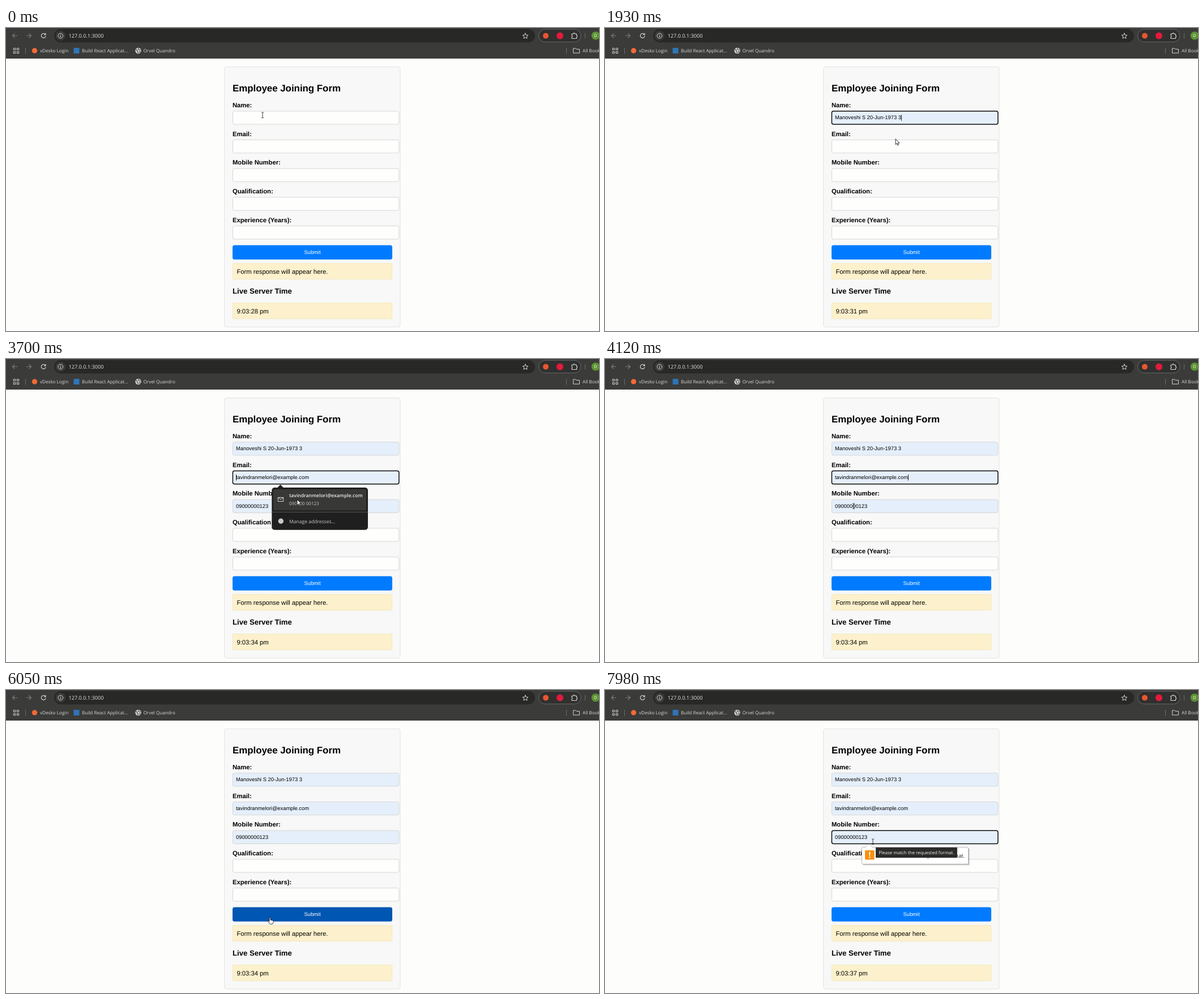
These frames come from a looping animation (1047x535 px, 8000 ms). An HTML page:

```html
<!DOCTYPE html>
<html lang="en">
<head>
<meta charset="utf-8">
<title>Employee Joining Form</title>
<style>
  html, body { margin: 0; width: 100%; height: 100%; overflow: hidden; background: #fdfdfc; }
  svg { display: block; width: 100%; height: 100%; }
  text { font-family: "Liberation Sans", Arial, sans-serif; font-size: 11.23px; text-rendering: geometricPrecision; white-space: pre; }
  .ui text { font-family: "Open Sans", "Noto Sans", sans-serif; }
  .bar text { font-size: 8.15px; fill: #d8d8d6; }
  .menu text { font-size: 8.55px; fill: #c9c9c7; }
  .menu .strong { font-weight: 600; fill: #ececea; }
  .label { font-weight: bold; }
  .value { font-size: 9.36px; }
  .line { fill: none; stroke: #d4d4d2; stroke-width: 1.2; stroke-linecap: round; stroke-linejoin: round; }
  .note { fill: #fcf1cc; stroke: #f6e6b4; stroke-width: .8; }
</style>
</head>
<body>
<svg id="stage" viewBox="0 0 1047 535">
  <rect width="1047" height="535" fill="#fdfdfc"/>

  <g class="ui bar">
    <rect width="1047" height="54" fill="#3b3b39"/>
    <rect x="85" y="2" width="849" height="23.5" rx="11.7" fill="#282827"/>
    <path class="line" d="M19.5 13.5H11.5M15 10l-3.5 3.5 3.5 3.5" style="stroke:#7c7c7a"/>
    <path class="line" d="M36.500 13.500H44.500M41 10l3.500 3.500-3.500 3.500" style="stroke:#7c7c7a"/>
    <path class="line" d="M69.300 11.200A3.900 3.900 0 1 0 70 14.600M70 9.500V12H67.500"/>
    <circle cx="96.300" cy="13.700" r="8.600" fill="#3b3b39"/>
    <circle class="line" cx="96.300" cy="13.700" r="4.300" style="stroke-width:1"/>
    <path class="line" d="M96.300 13.500V15.700M96.300 11.600v.1"/>
    <text x="110.500" y="17.200" style="font-size:9.150px;fill:#e4e4e2">127.0.0.1:3000</text>
    <path class="line" d="M917 9.200l1.400 3.200 3.500.3-2.700 2.300.8 3.400-3-1.800-3 1.800.8-3.400-2.700-2.300 3.500-.3z" style="stroke-width:1"/>
    <rect x="940.500" y="2.300" width="74.500" height="22.400" rx="11.200" fill="#30302f" stroke="#66686b"/>
    <circle cx="953" cy="13.700" r="5" fill="#e8562f"/>
    <circle cx="978" cy="13.700" r="6" fill="#e21b3c"/>
    <path class="line" d="M999 10.500h2.600a1.600 1.600 0 0 1 3.200 0h2.700v2.900a1.500 1.500 0 0 1 0 2.900v2.200h-8.500v-2.500a1.500 1.500 0 0 0 0-2.800z"/>
    <path d="M1022.500 9v9.500M34.500 35v10.500M989.500 35v10.500" stroke="#6c6c69"/>
    <circle cx="1041" cy="13.500" r="7.300" fill="#5c9432"/>
    <text x="1038" y="16.300" style="fill:#fff;font-size:7.500px">D</text>

    <g class="line" style="stroke-width:1">
      <path d="M13.700 35.700h3v3h-3zM19.700 35.700h3v3h-3zM13.700 41.700h3v3h-3zM19.700 41.700h3v3h-3z"/>
      <path d="M1002 36h3.700l1.200 1.400h5.600v6.800h-10.500z"/>
    </g>
    <circle cx="50.500" cy="40" r="4.700" fill="#f26a35"/>
    <rect x="119.500" y="35" width="10" height="10" fill="#2f74b5"/>
    <circle cx="233.500" cy="40" r="5.200" fill="#d4d4d2"/>
    <path d="M229.500 37.500l2.500 2-.4 1.600 1.700 1.600-.5 1.800M234.500 35.500l-1 1.700 2 1.500h2.300M235 41.500l2 .5-1.300 1.700" fill="none" stroke="#3b3b39" stroke-width="1.100"/>
    <text x="60" y="43">vDesko Login</text>
    <text x="134" y="43">Build React Applicat...</text>
    <text x="242.500" y="43">Orvel Quandro</text>
    <text x="1018" y="43">All Bookmarks</text>
  </g>

  <rect x="385.700" y="68.600" width="310.300" height="459.400" rx="3.500" fill="#f7f8f7" stroke="#e0e0de" stroke-width=".9"/>
  <text class="label" x="400" y="112" style="font-size:16.850px">Employee Joining Form</text>
  <g id="form"></g>
  <rect id="button" x="400" y="383.500" width="282" height="25.300" rx="3.500"/>
  <text class="value" x="541" y="398.700" text-anchor="middle" fill="#fff">Submit</text>
  <rect class="note" x="400.400" y="415.700" width="281.300" height="27.600"/>
  <text x="407.500" y="433.700">Form response will appear here.</text>
  <text class="label" x="400" y="469" style="font-size:13.140px">Live Server Time</text>
  <rect class="note" x="400.400" y="485.700" width="281.300" height="27.600"/>
  <text id="clock" x="407.500" y="503.700"></text>
  <rect id="caret" y="0" width=".9" height="10.500"/>

  <g id="nameMenu" class="ui menu">
    <path d="M478.500 177.500l6-6.300 6 6.300z" fill="#1f1f1f"/>
    <rect x="469.300" y="176.500" width="154" height="88.800" rx="5" fill="#1f1f1f"/>
    <rect class="hover" x="472" y="179.300" width="148.500" height="25.700" rx="3" fill="#383836"/>
    <g class="person"></g>
    <text class="strong" x="500" y="195.200">Manoveshi S 20-Jun-1973 3</text>
    <text class="strong" x="500" y="220.600">Dhelvomar 27-May-1974 4</text>
    <path d="M469.500 233.700h153.500" stroke="#5a5a58"/>
    <circle cx="485.300" cy="249.700" r="4.700" fill="#c9c9c7"/>
    <text x="500" y="252.700">Manage addresses...</text>
  </g>

  <g id="mailMenu" class="ui menu">
    <path d="M478.500 228l6-6.300 6 6.300z" fill="#1f1f1f"/>
    <rect x="469.300" y="227" width="169.700" height="74.700" rx="5" fill="#1f1f1f"/>
    <rect class="hover" x="472" y="230" width="164.300" height="37.300" rx="3" fill="#383836"/>
    <path class="line" d="M480.700 244.500h9v7h-9zl4.500 3.500 4.500-3.500" style="stroke-width:1"/>
    <text class="strong" x="500" y="244.300">tavindranmelori@example.com</text>
    <text x="500" y="258.200" style="font-size:8.050px">090000 00123</text>
    <path d="M469.500 270.300h169.300" stroke="#5a5a58"/>
    <circle cx="485.300" cy="286.300" r="4.700" fill="#c9c9c7"/>
    <text x="500" y="289.500">Manage addresses...</text>
  </g>

  <g id="bubble" class="ui">
    <path d="M456 280.500h188v29.500h-188z" fill="#000" opacity=".1"/>
    <path d="M455 279.500h188v29.300h-188z" fill="#000" opacity=".16"/>
    <path d="M455.500 277.800h4.500l6-6 6 6h167.500q2 0 2 2v25.500q0 2-2 2h-184q-2 0-2-2v-25.500q0-2 2-2z" fill="#fff" stroke="#a9a9a7" stroke-width=".8"/>
    <rect x="459" y="283" width="16.600" height="16.600" rx="1.500" fill="#f8900f"/>
    <path d="M466.200 286h2.200l-.3 6.500h-1.600zM466.200 294.200h2.200v2.200h-2.200z" fill="#fff"/>
    <text x="481" y="296.300" fill="#222" style="font-size:9.230px">Please match the requested format.</text>
  </g>
  <g id="tip" class="ui">
    <rect x="478.300" y="278.300" width="143" height="17.500" fill="#2b2b2a" stroke="#111" stroke-width=".7"/>
    <text x="483.300" y="290" fill="#f2f2f0" style="font-size:7.970px">Please match the requested format.</text>
  </g>

  <g id="cursor">
    <path id="beam" d="M-2-4.500h1.500l.5.500.5-.500H2M0-4v8.500M-2 5h1.500l.5-.500.5.500H2" fill="none" stroke="#222" stroke-width=".9"/>
    <path id="arrow" d="M0 0v10l2.300-2.100 1.500 3.500 1.600-.7-1.500-3.400h3.100z" fill="#fff" stroke="#000" stroke-width=".8"/>
    <path id="hand" d="M-1 .3q1-1 2 0v4.200l4.200 1q1 .3 1 1.300l-.7 3.300q-.3 1.700-1.800 1.700H.8q-1 0-1.600-1L-3.500 7q-.2-1.200 1-1l1.500 1.200z" fill="#fff" stroke="#000" stroke-width=".8"/>
  </g>
</svg>
<script>
const LOOP = 8000, BLINK = 500, PITCH = 50.7, TOP = 146.8, BOX_H = 23.2;
const $ = id => document.getElementById(id);
const show = (node, on) => node.setAttribute('visibility', on ? 'visible' : 'hidden');

function add(parent, tag, attrs, text = '') {
  const node = document.createElementNS('http://www.w3.org/2000/svg', tag);
  for (const key in attrs) node.setAttribute(key, attrs[key]);
  node.textContent = text;
  parent.appendChild(node);
  return node;
}

// filled: when each value, typed in or previewed, appears
const fields = [
  { label: 'Name:', text: 'Manoveshi S 20-Jun-1973 3', filled: 1010 },
  { label: 'Email:', text: 'tavindranmelori@example.com', filled: 2900 },
  { label: 'Mobile Number:', text: '09000000123', filled: 2900 },
  { label: 'Qualification:', text: '', filled: Infinity },
  { label: 'Experience (Years):', text: '', filled: Infinity }
].map((field, i) => {
  const y = TOP + PITCH * i, form = $('form');
  add(form, 'text', { class: 'label', x: 400, y: y - 6.8 }, field.label);
  return {
    ...field, y,
    box: add(form, 'rect', { x: 400.4, y, width: 293.4, height: BOX_H, rx: 3 }),
    value: add(form, 'text', { class: 'value', x: 406, y: y + 14.3 }, field.text)
  };
});

for (const y of [191.7, 217.2]) {
  const g = add(document.querySelector('.person'), 'g', {
    transform: `translate(485.3 ${y})`, fill: 'none', stroke: '#d4d4d2'
  });
  add(g, 'circle', { r: 4.2 });
  add(g, 'circle', { cy: -1, r: 1.3 });
  add(g, 'path', { d: 'M-2.800 3Q0 .5 2.800 3' });
}

// focus spans: start, end, field, time from which the caret sits after the text
const focuses = [
  [600, 1850, 0, Infinity],
  [1850, 2250, 0, 1850],
  [2250, 3750, 1, Infinity],
  [3750, 6000, 1, 3750],
  [6270, LOOP, 2, Infinity]
];

const path = [
  [0, 453, 153.5], [920, 453, 153.5], [1110, 519, 201], [1140, 519, 201],
  [1390, 515, 195], [1880, 515, 195], [2200, 485, 206], [2690, 485, 206],
  [2980, 514, 248], [3770, 514, 248], [4090, 439, 259.5], [4130, 439, 259.5],
  [4330, 429, 266], [4370, 429, 266], [4410, 428, 267], [4750, 428, 267],
  [5540, 442, 330], [5590, 442, 330], [5900, 466, 401.500], [6430, 466, 401.500],
  [6740, 471.5, 275.5], [7270, 471.5, 275.5], [7450, 473, 267.5], [LOOP, 473, 267.5]
];

function cursorAt(t) {
  const i = path.findIndex((p, k) => k && t <= p[0]);
  const [t0, x0, y0] = path[i - 1], [t1, x1, y1] = path[i];
  const k = (t - t0) / (t1 - t0), e = k * k * (3 - 2 * k);
  return [x0 + (x1 - x0) * e, y0 + (y1 - y0) * e];
}

function draw(t) {
  const focus = focuses.find(f => t >= f[0] && t < f[1]);
  const active = focus && fields[focus[2]];

  for (const f of fields) {
    const filled = t >= f.filled, on = f === active;
    f.box.setAttribute('fill', filled ? '#e5effb' : '#fefefd');
    f.box.setAttribute('stroke', on ? '#0c0c0c' : '#cfcfcd');
    f.box.setAttribute('stroke-width', on ? 1.5 : .8);
    show(f.value, filled);
  }

  const caretOn = focus && Math.floor((t - focus[0]) / BLINK) % 2 === 0;
  if (caretOn) {
    const end = t >= focus[3] ? active.value.getComputedTextLength() : 0;
    $('caret').setAttribute('x', 406 + end);
    $('caret').setAttribute('y', active.y + 6.5);
  }
  show($('caret'), caretOn);

  const nameOpen = t >= 620 && t < 1850, mailOpen = t >= 2270 && t < 3750;
  show($('nameMenu'), nameOpen);
  show($('mailMenu'), mailOpen);
  show($('nameMenu').querySelector('.hover'), nameOpen && t >= fields[0].filled);
  show($('mailMenu').querySelector('.hover'), mailOpen && t >= fields[1].filled);
  show($('bubble'), t >= 6270);
  show($('tip'), t >= 7900);

  const seconds = 28 + 3 * Math.floor((t + 2400) / 3000);
  $('clock').textContent = `9:03:${seconds} pm`;

  const [x, y] = cursorAt(t);
  const inButton = y > 383.5 && y < 408.8;
  const inMenu = (nameOpen && y > 176) || (mailOpen && y > 227);
  const inField = !inMenu && fields.some(f => y >= f.y && y <= f.y + BOX_H);
  $('button').setAttribute('fill', inButton ? '#0056b3' : '#007bff');
  $('cursor').setAttribute('transform', `translate(${x} ${y})`);
  show($('hand'), inButton);
  show($('beam'), inField);
  show($('arrow'), !inButton && !inField);
}

const start = performance.now();
function tick() {
  draw((performance.now() - start) % LOOP);
  requestAnimationFrame(tick);
}
tick();
</script>
</body>
</html>
```
